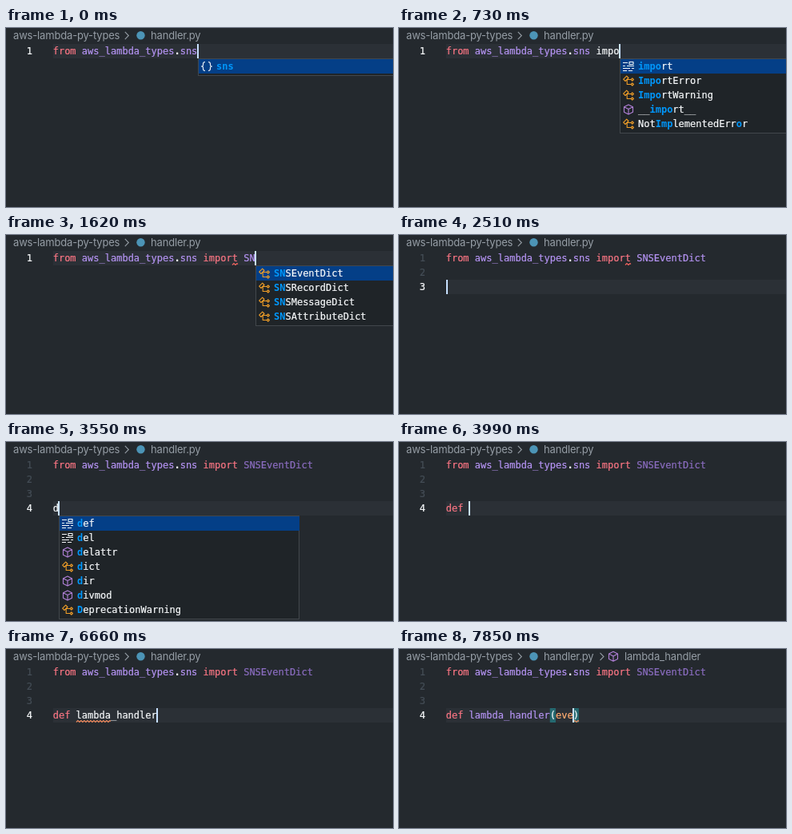
Animation, 484 px wide and 224 px high, one loop 8000 ms. Source, as an HTML page:

```html
<!DOCTYPE html>
<html lang="en">
<head>
<meta charset="utf-8">
<title>Typing a handler</title>
<style>
  html, body { margin: 0; width: 100%; height: 100%; overflow: hidden; background: #24292e; }
  svg { display: block; width: 484px; height: 224px; }
  text { white-space: pre; color: #f6f8fa; }
  text, tspan { fill: currentColor; stroke: currentColor; stroke-width: .22px; }
  .code text, .list text { font: 12px "DejaVu Sans Mono", monospace; }
  .crumb text { font: 13px Inter, sans-serif; letter-spacing: -.17px; color: #959da5; stroke: none; }
  .crumb path.sep { fill: none; stroke: #959da5; stroke-width: 1.1; }
  .k { color: #f97583; }
  .p { color: #b392f0; }
  .u { color: #8a6cbf; }
  .o { color: #ffab70; }
  .b { font-weight: bold; }
  .m { color: #0097fb; font-weight: bold; stroke: none; }
  .icon { fill: none; stroke-width: 1.1; stroke-linejoin: round; }
</style>
</head>
<body>
<svg id="stage" viewBox="0 0 484 224"></svg>
<script>
const LOOP = 8000, LEFT = 58.7, CHAR = 7.2246, TOP = 20, ROW = 18;
const stage = document.getElementById("stage");

// Markup: {class|text}
const HEAD = "{k|from} {p|aws_lambda_types}{b|.}{p|sns}";
const IMPORT = HEAD + " {k|import} ";
const DONE = IMPORT + "{p|SNSEventDict}";
const UNUSED = IMPORT + "{u|SNSEventDict}";
const body = line => [UNUSED, "", "", line];
const def = rest => body("{k|def} " + rest);

const ERROR = "#f4645f", WARN = "#f08a5d";
const importWave = { row: 0, from: 31, to: 32, color: ERROR };
const nameWave = { row: 3, from: 4, to: 10, color: WARN };
const endWave = n => ({ row: 3, from: n, to: n + 1, color: WARN });

// Suggestions: icon letter, then label
const LISTS = {
  sns: ["n {m|sns}"],
  i: ["k {m|i}f", "k {m|i}mport", "k {m|i}n", "k {m|i}s", "f {m|i}d", "f {m|i}nput",
      "c {m|i}nt", "f {m|i}sinstance", "f {m|i}ssubclass", "f {m|i}ter"],
  im: ["k {m|im}port", "c {m|Im}portError", "c {m|Im}portWarning", "f __{m|im}port__", "c Not{m|Im}plementedError"],
  impo: ["k {m|impo}rt", "c {m|Impo}rtError", "c {m|Impo}rtWarning", "f __{m|impo}rt__", "c Not{m|Imp}lementedErr{m|o}r"],
  impor: ["k {m|impor}t", "c {m|Impor}tError", "c {m|Impor}tWarning", "f __{m|impor}t__", "c Not{m|Imp}lementedErr{m|or}"],
  import: ["k {m|import}", "c {m|Import}Error", "c {m|Import}Warning", "f __{m|import}__"],
  S: ["c {m|S}NSEventDict", "c {m|S}NSRecordDict", "c {m|S}NSMessageDict", "c {m|S}NSAttributeDict", "n {m|s}ys"],
  SN: ["c {m|SN}SEventDict", "c {m|SN}SRecordDict", "c {m|SN}SMessageDict", "c {m|SN}SAttributeDict"],
  d: ["k {m|d}ef", "k {m|d}el", "f {m|d}elattr", "c {m|d}ict", "f {m|d}ir", "f {m|d}ivmod", "c {m|D}eprecationWarning"],
  def: ["k {m|def}", "c Un{m|d}efinedError"]
};

// [ms, lines, cursor row, cursor column, extras]
const STEPS = [
  [0, [HEAD], 0, 25, { list: "sns" }],
  [150, [HEAD], 0, 25],
  [440, [HEAD + " i"], 0, 27, { list: "i" }],
  [590, [HEAD + " im"], 0, 28, { list: "im" }],
  [730, [HEAD + " impo"], 0, 30, { list: "impo" }],
  [880, [HEAD + " impor"], 0, 31, { list: "impor" }],
  [1030, [HEAD + " {k|import}"], 0, 32, { list: "import" }],
  [1180, [IMPORT], 0, 33],
  [1470, [IMPORT + "{p|S}"], 0, 34, { list: "S", wave: importWave }],
  [1620, [IMPORT + "{p|SN}"], 0, 35, { list: "SN", wave: importWave }],
  [1920, [DONE], 0, 45, { wave: importWave }],
  [2220, [DONE, ""], 1, 0, { wave: importWave }],
  [2370, [DONE, "", ""], 2, 0, { wave: importWave }],
  [2810, [DONE, "", "", ""], 3, 0, { wave: importWave }],
  [2960, [DONE, "", "", ""], 3, 0],
  [3100, body(""), 3, 0],
  [3550, body("d"), 3, 1, { list: "d" }],
  [3840, body("{k|def}"), 3, 3, { list: "def" }],
  [3990, def(""), 3, 4],
  [4290, def("l"), 3, 5],
  [4440, def("la"), 3, 6],
  [4590, def("lam"), 3, 7],
  [4730, def("lamb"), 3, 8],
  [4880, def("{k|lambda}"), 3, 10],
  [5330, def("{k|lambda}"), 3, 10, { wave: nameWave }],
  [5480, def("{k|lambda}"), 3, 10, { wave: nameWave, hidden: true }],
  [5630, def("lambda_"), 3, 11, { wave: nameWave }]
];
["h", "ha", "han", "hand", "handl", "handler"].forEach((s, i) =>
  STEPS.push([[5920, 6070, 6220, 6360, 6510, 6660][i], def("lambda_" + s), 3, 11 + s.length, { wave: nameWave }]));
[[6960, ""], [7260, ""], [7410, "e"], [7550, "ev"], [7850, "{o|eve}"]].forEach(([ms, arg], i) => {
  const col = 19 + [0, 0, 1, 2, 3][i];
  STEPS.push([ms, def(`{p|lambda_handler}(${arg})`), 3, col,
    { brackets: [18, col], wave: i ? endWave(col) : nameWave, symbol: i > 0 }]);
});

const rect = (x, y, w, h, fill, more = "") =>
  `<rect x="${x}" y="${y}" width="${w}" height="${h}" fill="${fill}" ${more}/>`;
const spans = s => s.replace(/\{(\w)\|([^}]*)\}/g, '<tspan class="$1">$2</tspan>');
const label = (x, y, s, more = "") => `<text x="${x}" y="${y}" ${more}>${spans(s)}</text>`;
const colX = n => LEFT + n * CHAR;
const rowY = n => TOP + n * ROW;

// Icons are centred on 0,0
const cube = "M0-6L5.5-3.2V3.2L0 6L-5.5 3.2V-3.2ZM-5.5-3.2L0-.4L5.5-3.2M0-.4V6";
const ICONS = {
  k: ["#f6f8fa", "M-7-4.5H-1M1-5.5H6V-2.5H1ZM-7-.5H-4M-2-.5H7M-7 2.5H2M4 2.5H7M-7 5.5H-2M0 5.5H5"],
  c: ["#ee9d28", "M-6.3-1.8L-2.3-5.8L0-3.5L-4 .5ZM-1.8-1.5H3.5M-1.8-1.5V4.5H3.5M3.2-1.5L4.8-3.1L6.4-1.5L4.8 .1ZM3.2 4.5L4.8 2.9L6.4 4.5L4.8 6.1Z"],
  f: ["#b180d7", cube],
  n: ["#f6f8fa", "M-2-5.5Q-4.5-5.5-4.5-3V-1.5Q-4.5 0-6.5 0Q-4.5 0-4.5 1.5V3Q-4.5 5.5-2 5.5M2-5.5Q4.5-5.5 4.5-3V-1.5Q4.5 0 6.5 0Q4.5 0 4.5 1.5V3Q4.5 5.5 2 5.5"]
};
const icon = (kind, x, y) =>
  `<path class="icon" transform="translate(${x} ${y})" stroke="${ICONS[kind][0]}" d="${ICONS[kind][1]}"/>`;

function squiggle({ row, from, to, color }) {
  const x0 = colX(from) + .3, y = rowY(row) + 16.5;
  let d = `M${x0} ${y + 1}`;
  for (let x = 1; x <= (to - from) * CHAR; x++)
    d += `L${(x0 + x).toFixed(2)} ${(y + Math.cos(x * Math.PI / 2)).toFixed(2)}`;
  return `<path d="${d}" fill="none" stroke="${color}" stroke-width="1.1"/>`;
}

function crumbs(symbol) {
  const sep = x => `<path class="sep" d="M${x} 4.8L${x + 4.5} 9.5L${x} 14.2"/>`;
  let out = label(9, 14, "aws-lambda-py-types") + sep(148.8) +
    '<circle cx="168.5" cy="9.3" r="5.2" fill="#4c94b6"/>' + label(181, 14, "handler.py");
  if (symbol) out += sep(251.5) + icon("f", 268, 9.3) + label(282, 14, "lambda_handler");
  return `<g class="crumb">${out}</g>`;
}

function popup(items, row, col) {
  const x = Math.ceil(colX(col)), y = rowY(row + 1), h = items.length * ROW + 3;
  let out = rect(x + .5, y + .5, 300, h, "#1f2428", 'stroke="#42474c"') +
    rect(x + 1, y + 1, 300, ROW, "#043f87");
  items.forEach((item, i) => {
    const top = y + 1 + i * ROW;
    out += icon(item[0], x + 11, top + 9) + label(x + 23, top + 13, item.slice(2));
  });
  return `<g class="list">${out}</g>`;
}

function draw([, lines, row, col, extra = {}]) {
  let out = rect(0, 0, 484, 224, "#24292e") + rect(59, rowY(row), 425, ROW, "#2b3036");
  for (const n of extra.brackets || [])
    out += rect(colX(n), rowY(row), CHAR, ROW, "#256970");
  lines.forEach((line, i) => {
    const y = rowY(i) + 13;
    out += label(33, y, String(i + 1), `text-anchor="end" style="color:${i === row ? "#f6f8fa" : "#444d56"}"`);
    out += label(LEFT, y, line);
  });
  if (extra.wave) out += squiggle(extra.wave);
  if (!extra.hidden)
    out += rect(Math.max(59, Math.floor(58.5 + col * CHAR)), rowY(row), 2, ROW, "#c8e1ff");
  out = `<g class="code">${out}</g>` + crumbs(extra.symbol);
  if (extra.list) out += popup(LISTS[extra.list], row, col);
  stage.innerHTML = out;
}

let shown;
const start = performance.now();
function tick() {
  const t = (performance.now() - start) % LOOP;
  const step = STEPS.findLast(s => s[0] <= t) || STEPS[0];
  if (step !== shown) draw(shown = step);
  requestAnimationFrame(tick);
}
tick();
</script>
</body>
</html>
```
